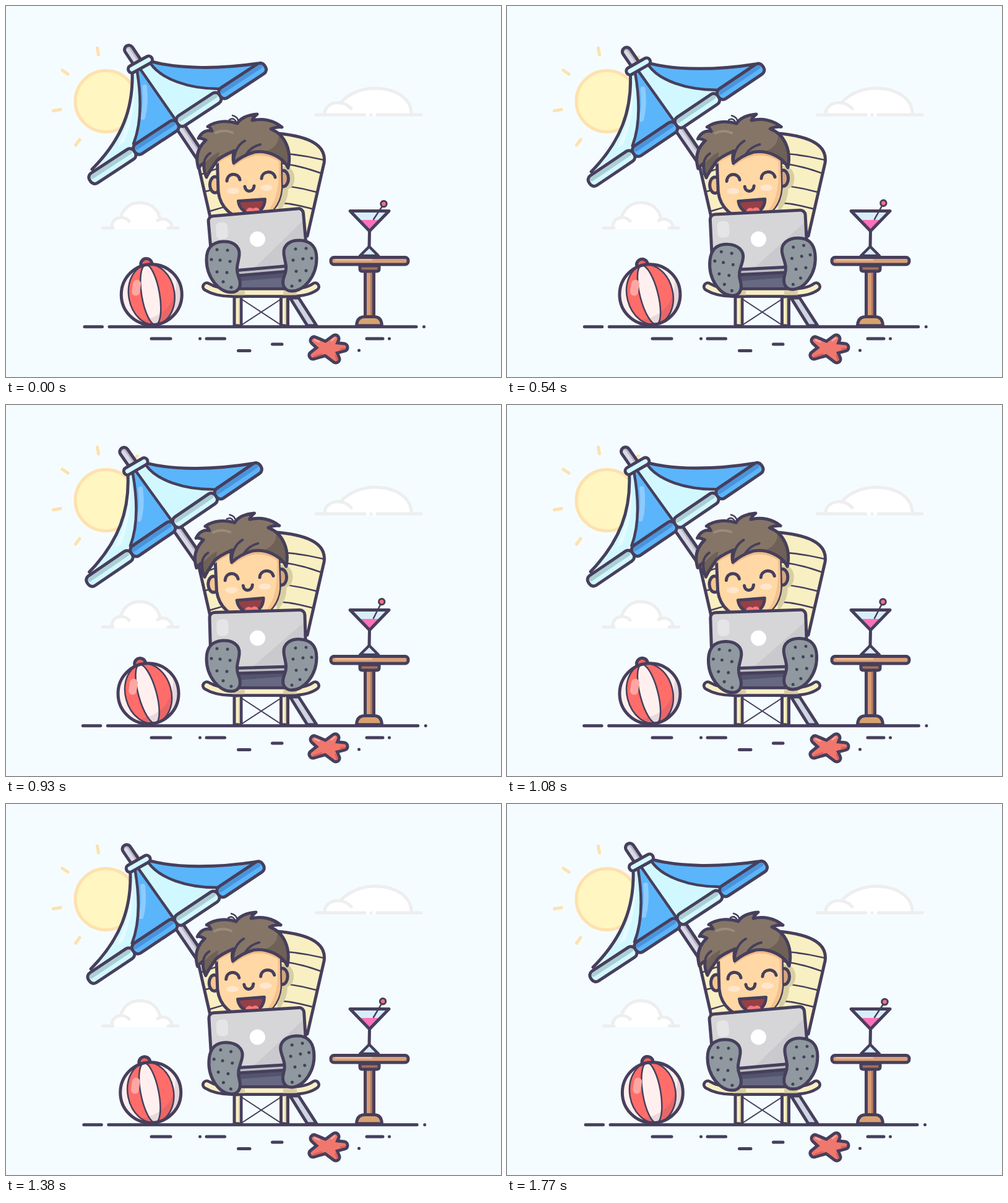
These frames come from a looping animation (800 by 600 pixels, 1.8 s). An HTML page:

```html
<!DOCTYPE html>
<html lang="en">
<head>
<meta charset="utf-8">
<title>Working at the beach</title>
<style>
html, body { margin: 0; width: 100%; height: 100%; overflow: hidden; background: #f4fcff; }
svg { display: block; width: 800px; height: 600px; }
.ink { stroke: #463f5c; stroke-width: 5; stroke-linecap: round; stroke-linejoin: round; }
.thin { stroke-width: 2.5; }
.none { fill: none; }
</style>
</head>
<body>
<svg viewBox="0 0 800 600">
<defs>
  <path id="faceShape" d="M341 235L343 300C346 325 365 345 395 345C425 345 443 322 445 295L444 235Z"/>
  <path id="hairShape" d="M324 277C320 268 319 262 320 254C316 256 313 259 311 262C306 245 309 230 323 217C317 214 314 213 311 214C316 204 324 200 333 202C331 198 329 195 326 195C340 185 360 185 374 190C378 182 390 176 406 175C402 178 399 181 398 185C415 181 433 185 446 196C438 195 432 197 428 199C452 208 462 235 456 262C448 245 425 233 402 236C388 240 378 245 368 254C366 246 367 240 369 234C360 238 348 243 341 250C334 260 328 268 324 277Z"/>
  <path id="seat" d="M324.500 454C336 461 350 463.500 365 463.500H460C475 463.500 490 461 499.500 454"/>
  <path id="starShape" d="M498 541L517 549L532 538L527 550L546 552L527 557L533 571L517 559L496 565L511 553Z"/>
  <g id="foot">
    <path class="ink" fill="#8f999f" d="M350 381C366 380 378 388 377 402C376 415 370 424 376 438C382 453 376 463 364 463C345 463 324 440 324 410C324 392 333 382 350 381Z"/>
    <path class="ink none" d="M341 394h.01M358 395h.01M332 410h.01M346 411h.01M362 413h.01M341 430h.01M357 431h.01M351 446h.01M364 455h.01"/>
  </g>
  <clipPath id="faceClip"><use href="#faceShape"/></clipPath>
  <clipPath id="hairClip"><use href="#hairShape"/></clipPath>
  <clipPath id="lidClip"><rect x="330" y="333.500" width="154" height="91" rx="8"/></clipPath>
  <clipPath id="ballClip"><circle r="49"/></clipPath>
</defs>

<!-- sky -->
<g stroke="#ffe1ad" stroke-width="5" stroke-linecap="round">
  <circle cx="161.500" cy="154" r="49.500" fill="#fff6c2"/>
  <path d="M147.500 68L149.500 79M91 104L100 110M76.500 169.500L88 167.500M119 216L112.500 225M206 88L212.500 82.500"/>
</g>
<g stroke="#eee" stroke-width="5" stroke-linecap="round" fill="none">
  <path stroke="none" fill="#fff" d="M514 178C512 160 530 153 540 157C555 140 580 133 597 133C630 133 655 150 655 178Z"/>
  <path d="M501 176H580M590 176h.01M600 176H671M515 174C515 156 543 149 558 166M540 157C555 140 577 133 597 133C630 133 655 150 655 174"/>
  <path stroke="none" fill="#fff" d="M170 361C168 345 178 340 186 343C190 325 202 318 216 318C236 318 247 331 249 345C258 340 268 347 268 361Z"/>
  <path d="M156 359H173M262 359H278M171 357C171 341 190 338 199 348M185 342C190 326 202 318 216 318C236 318 247 331 249 345M245 347C256 341 267 347 268 357"/>
</g>

<!-- parasol -->
<g id="parasol">
  <path class="ink" style="stroke-width:19" d="M198.500 70.500L332 270"/>
  <path stroke="#b5b5c3" stroke-width="9" stroke-linecap="round" d="M198.500 70.500L332 270"/>
  <path stroke="#d9dae6" stroke-width="6" stroke-linecap="round" d="M197.500 71.500L331 271"/>
  <path fill="#d2f8ff" d="M204 106C206 165 188 215 139 264L274 183L345 134L232 92Z"/>
  <path fill="#e6fbff" d="M204 125C205 165 196 195 181 226L191 220C204 187 209 155 208 125Z"/>
  <path fill="#5bb5fb" d="M212 106C219 150 219 190 206 223L274 181L219 104Z"/>
  <path fill="none" stroke="#8dcbfd" stroke-width="8" stroke-linecap="round" d="M224 131C226 150 225 165 221 180"/>
  <path fill="#5bb5fb" d="M236 90C280 102 345 102 404 93L345 134C295 134 250 118 232 92Z"/>
  <g class="ink none">
    <path d="M204 106C206 165 188 215 139 264M236 90C280 102 345 102 406 93"/>
    <path style="stroke-width:4.500" d="M212 106C219 150 219 190 206 223M217 102L274 184M233 92C250 118 295 134 345 134"/>
  </g>
  <g id="valances" transform="translate(146 276) rotate(-33.300)"></g>
  <path class="ink" style="stroke-width:17" d="M203.500 102L230.500 87"/>
  <path stroke="#d2f8ff" stroke-width="7" stroke-linecap="round" d="M203.500 102L230.500 87"/>
</g>

<!-- deck chair -->
<path class="ink" fill="#f8efc3" d="M308 245L337 372H487L514 254C518 228 496 211 438 206H340Z"/>
<path class="ink thin none" d="M310 252Q412 224 513 249M316 272Q410 234 508 270M322 300Q411 276 502 301M329 332Q411 304 495 328"/>
<path class="ink" fill="#cfd5e1" d="M459 472L487 517H502L473 472Z"/>
<path class="ink none thin" style="stroke-width:2" d="M382 475L443 515M443 475L382 515"/>
<path class="ink" fill="#f8efc3" d="M369 470H380V517H369ZM444.500 470H455.500V517H444.500Z"/>
<path fill="#d8cea2" d="M376 472h2v43h-2zM451 472h2v43h-2z"/>

<!-- head -->
<g id="head">
  <path fill="#d8cea2" d="M440 335C454 318 456 306 456 296C469 293 470 268 458 262L435 255Z"/>
  <ellipse class="ink" cx="338" cy="289" rx="8.500" ry="13" fill="#f6c590"/>
  <ellipse class="ink" cx="448" cy="279" rx="8.500" ry="13" fill="#d6a57c"/>
  <use href="#faceShape" class="ink" fill="#ffd8a5"/>
  <g clip-path="url(#faceClip)">
    <path fill="#f5c38e" d="M440 240C443 290 440 325 407 345H450V240Z"/>
    <use href="#hairShape" y="6" fill="#f0ba85"/>
  </g>
  <ellipse cx="367" cy="299" rx="10" ry="5" fill="#ffe6ce"/>
  <ellipse cx="421" cy="294" rx="10" ry="5" fill="#ffe6ce"/>
  <path class="ink none" d="M357 283C358 269 376 269 378 281M413 279C414 266 432 265 435 277M386 292C387 302 400 302 401 291"/>
  <path class="ink" fill="#964046" d="M375.500 315.500L418.500 312.500C418 328 408 335 398 335C386 335 377 328 375.500 315.500Z"/>
  <path fill="#f5777a" d="M388 332C389 326 396 325 399 328C403 324 410 326 410 332Z"/>
  <path class="ink none thin" d="M373 190C371 184 367 180 361 184M376 188C375 182 371 178 366 177"/>
  <use href="#hairShape" fill="#857566"/>
  <g clip-path="url(#hairClip)">
    <path fill="#6f6157" d="M460 205V270L402 237C425 238 444 226 440 205ZM308 265C322 255 333 240 345 236L335 280Z"/>
    <path fill="none" stroke="#9b8b7a" stroke-width="4" stroke-linecap="round" d="M339 205C349 200 360 202 366 205"/>
  </g>
  <use href="#hairShape" class="ink none"/>
  <path class="ink none" style="stroke-width:4" d="M368 254C368 237 375 224 386 218M388 240C394 231 402 226 411 224M320 254C321 247 325 241 330 238"/>
</g>

<!-- seat, legs and laptop -->
<path fill="#666981" d="M374 428H452V458H374Z"/>
<path fill="#53546d" d="M374 430H452V439L374 445Z"/>
<use href="#seat" class="ink none" style="stroke-width:17"/>
<use href="#seat" stroke="#f8efc3" stroke-width="7.500" stroke-linecap="round" fill="none"/>
<path stroke="#d8cea2" stroke-width="7" d="M366 464H386M448 464H470"/>
<g id="laptop">
  <rect class="ink" x="345" y="420" width="124" height="13" rx="3" fill="#bdbdc4"/>
  <rect x="330" y="333.500" width="154" height="91" rx="8" fill="#d6d6d8"/>
  <g clip-path="url(#lidClip)">
    <path fill="#cacace" d="M484 352L395 425H484Z"/>
    <rect x="341" y="345" width="19" height="27" rx="7" fill="#e5e5e7"/>
  </g>
  <rect class="ink none" x="330" y="333.500" width="154" height="91" rx="8"/>
  <circle cx="406.500" cy="377" r="12.500" fill="#fff"/>
</g>
<g id="leftFoot"><use href="#foot"/></g>
<g id="rightFoot"><use href="#foot" transform="translate(826 -2) scale(-1 1)"/></g>

<!-- table and drink -->
<g class="ink">
  <rect x="580.500" y="428" width="14" height="76" fill="#d79c75"/>
  <path fill="#a27059" d="M572 420H603V425Q603 429 599 429H576Q572 429 572 425Z"/>
  <path fill="#d8a26e" d="M566.500 517C567 506 573 502.500 580 502.500H595C602 502.500 607 506 607.500 517Z"/>
  <rect x="525" y="406.500" width="125" height="11.500" rx="5" fill="#d99f77"/>
</g>
<path fill="#ad7760" d="M589 432h3v68h-3z"/>
<path fill="#ecb98f" d="M532 409h60v3h-60z"/>
<path class="ink" style="stroke-width:4.500" fill="#d7eef8" d="M587 389L572 404H602Z"/>
<path fill="#d7eef8" d="M556 331.500H619L587.500 364Z"/>
<path fill="#ff70ba" d="M570 346H605L587.500 363Z"/>
<g id="pick">
  <path class="ink thin" d="M594 345L608 324"/>
  <circle class="ink" style="stroke-width:3" cx="610.500" cy="320" r="4.700" fill="#f4737e"/>
</g>
<path class="ink none" d="M556 331.500H619L587.500 364ZM587.500 364L587 389"/>

<!-- ball -->
<g id="ball">
  <g id="roll">
    <circle class="ink" cy="-50" r="9" fill="#ec6262"/>
    <circle r="49" fill="#fdeeed"/>
    <ellipse class="ink thin" rx="37" ry="49" fill="#ff6d6a"/>
    <ellipse class="ink thin" cx="-1.500" rx="14.500" ry="49" fill="#fff0ef"/>
  </g>
  <rect x="-31" y="-24" width="13" height="26" rx="6.500" fill="#ffa6a2" transform="rotate(8 -24 -11)"/>
  <path clip-path="url(#ballClip)" fill="#463f5c" opacity=".13" d="M40 -35C43 10 25 35 -20 43V55H55V-35Z"/>
  <circle class="ink none" r="49"/>
</g>

<!-- ground -->
<g class="ink none">
  <path id="ground"/>
  <path d="M235 538H266M313.500 538h.01M324 538H353.500M375.500 557.500H394M430.500 547H446M570.500 557h.01M583 538H609M619.500 538h.01"/>
</g>
<g stroke-linejoin="round" stroke-linecap="round" fill="none">
  <use href="#starShape" stroke="#463f5c" stroke-width="17"/>
  <use href="#starShape" stroke="#f0776d" stroke-width="7" fill="#f0776d"/>
  <path stroke="#d9605c" stroke-width="3" d="M498 567L510 563M535 572L533 565M541 555L547 554"/>
  <path stroke="#ff9f95" stroke-width="3" d="M499 540L506 543M526 541L531 537"/>
</g>
</svg>
<script>
const el = id => document.getElementById(id);
const set = (id, value, name = 'transform') => el(id).setAttribute(name, value);
const LOOP = 1800;

const edges = [-12, 74, 157, 239, 326];
el('valances').innerHTML = edges.slice(0, 4).map((x, i) => {
  const w = edges[i + 1] - x;
  const [light, shade] = i % 2 ? ['#5bb5fb', '#4a94dc'] : ['#d2f8ff', '#abcfd5'];
  const box = `x="${x}" y="-9.500" width="${w}" height="19" rx="8"`;
  return `<rect ${box} fill="${light}"/>
    <rect x="${x + 3}" y="-8" width="${w - 6}" height="8" rx="4" fill="${shade}"/>
    <rect ${box} class="ink none"/>`;
}).join('');

// eases 0 -> 1 -> 0 over one period
const sway = (t, period = LOOP) => (1 - Math.cos(t / period * 2 * Math.PI)) / 2;

function draw(now) {
  const t = now % LOOP;
  const s = sway(t), kick = sway(t, LOOP / 2), drift = sway(t + 90);
  set('parasol', `rotate(${-s} 485 516)`);
  set('head', `rotate(${-.9 * s} 398 465)`);
  set('laptop', `rotate(${-5 + 3.4 * s} 407 378)`);
  set('leftFoot', `rotate(${6 * kick} 307 452)`);
  set('rightFoot', `rotate(${-6 * kick} 433 447)`);
  set('pick', `rotate(${-7 * s} 594 346)`);
  set('ball', `translate(${235.4 - 5.6 * drift} 466.7)`);
  set('roll', `rotate(${-9.5 - 6.2 * drift})`);
  const out = 2.7 * s;
  set('ground', `M${127 - out} 518.700H${155.5 - out}M${167 - out} 518.700H${663 + out}M${675.5 + out} 518.700h.01`, 'd');
  requestAnimationFrame(draw);
}
draw(0);
</script>
</body>
</html>
```
